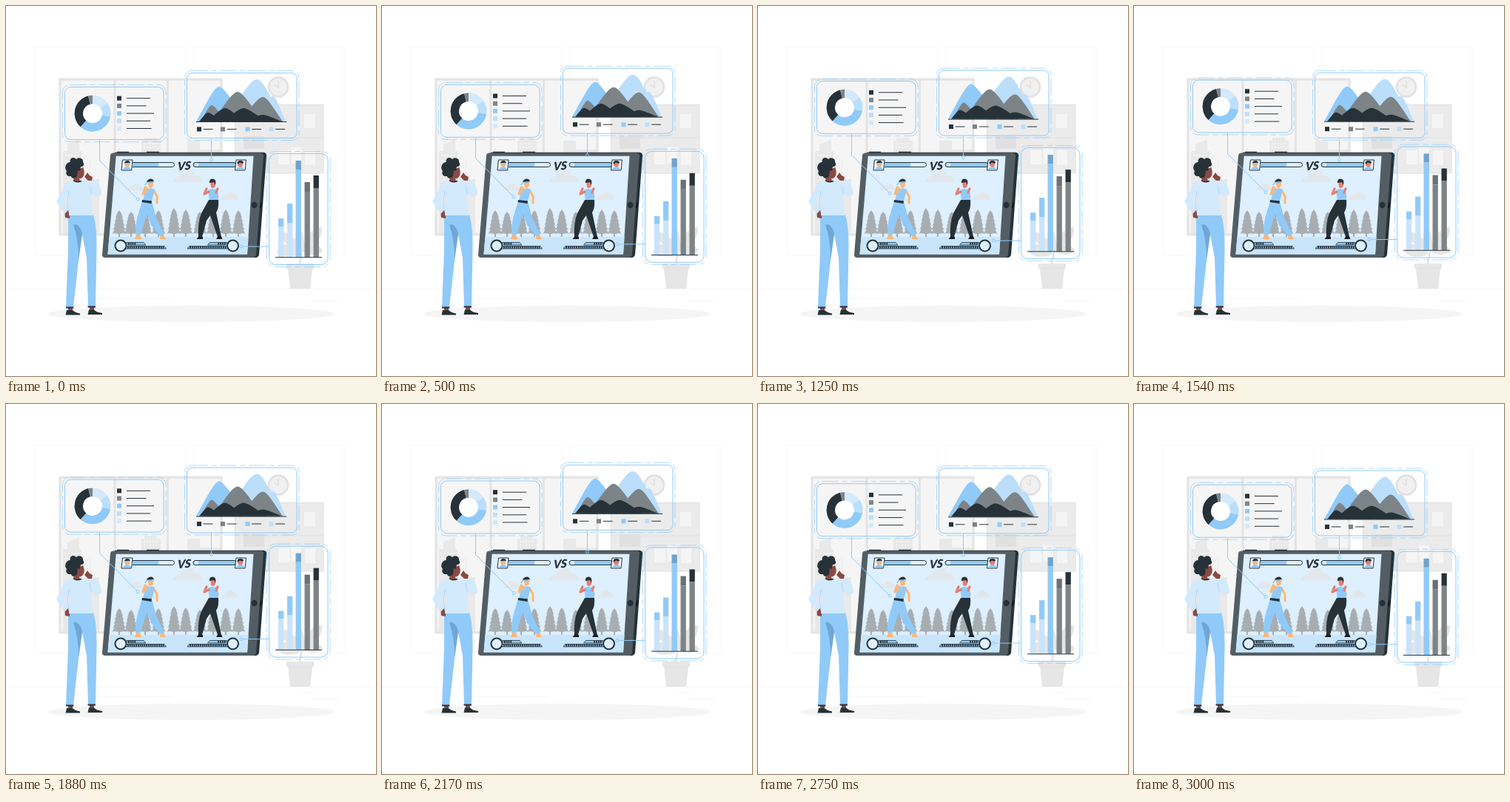
An HTML page that plays this animation: 500 px wide and 500 px high, repeating every 3040 ms.

```html
<!DOCTYPE html>
<html lang="en">
<head>
<meta charset="utf-8">
<title>Game analytics</title>
<style>
html, body { margin: 0; width: 100%; height: 100%; overflow: hidden; background: #fff; }
svg { display: block; width: 100vw; height: 100vh; }
.frame { fill: none; stroke: #90caf9; }
.dashes { fill: none; stroke: #90caf9; stroke-width: .7; stroke-dasharray: 22 5 7 5; }
.link, .dot { fill: none; stroke: #90caf9; }
.thin { stroke: #263238; stroke-width: 1; }
.limb { fill: none; stroke-linecap: round; stroke-linejoin: round; }
</style>
</head>
<body>
<svg viewBox="0 0 500 500">
  <g fill="none" stroke="#f5f5f5" stroke-width=".8">
    <rect x="39" y="55" width="204" height="282"/>
    <rect x="254" y="55" width="203" height="282"/>
    <path stroke="#ebebeb" stroke-width=".5" d="M0 382.300H500M112 395.300H224M400 389.500H416M416 398.500H448"/>
  </g>

  <g id="window">
    <rect x="73" y="99" width="218" height="210" fill="#f5f5f5"/>
    <g fill="#e9e9e9">
      <path d="M77 309V196H83V187L99 180V196H102V309ZM104 309V234H126V309ZM183 200V182H187V178H204V182H209V200ZM245 200V182H262V194H290V309H245Z"/>
      <path d="M113 208h1.200v30h-1.200z"/>
    </g>
    <path d="M80 202H100M80 209H100M80 216H100M186 186H207M186 191H207" stroke="#f5f5f5" stroke-width="2" stroke-dasharray="2 2"/>
    <path d="M73 99.200H291V309H73ZM147 99V309M218.500 99V309" fill="none" stroke="#e4e4e4" stroke-width="3.200"/>
  </g>

  <g id="shelf">
    <rect x="309.500" y="133.500" width="119.500" height="92.500" fill="#ebebeb" stroke="#e0e0e0"/>
    <path d="M310 178H429" stroke="#e0e0e0"/>
    <path d="M321 176h28v17h-28z" fill="#e0e0e0"/>
    <path d="M403 146h15v19h-15zM368 195h15v19h-15zM385 191h14v21l-13 1zM404 195h14v20h-14z" fill="#f5f5f5"/>
  </g>

  <g id="clock" stroke="#e0e0e0" fill="none">
    <circle cx="368" cy="109.500" r="13" fill="#f0f0f0" stroke-width="2.500"/>
    <path d="M368 101V110L362 106" stroke-width="1.500"/>
  </g>

  <g id="plant" fill="#e6e6e6">
    <path d="M379 348H416V355H414L411 382H384L381 355H379Z"/>
    <path d="M381 355H414" stroke="#e0e0e0"/>
    <path d="M397 348L401 326" stroke="#e0e0e0" stroke-width="2"/>
    <path d="M400 332C389 331 388 306 396 300C404 307 405 325 400 332ZM400 332C403 310 417 297 427 299C429 312 417 328 400 332ZM400 331C408 320 426 322 428 331C422 338 408 337 400 331ZM398 335C388 341 371 340 366 332C374 317 390 318 398 335ZM397 329C383 328 369 315 369 304C381 304 396 316 397 329Z"/>
  </g>

  <ellipse cx="250" cy="416" rx="194" ry="11" fill="#f5f5f5"/>

  <g id="tablet">
    <path d="M150 197.400H166M190 197.400H207" stroke="#263238" stroke-width="1.200"/>
    <path d="M147 197.700H348Q352 198 352 202L342 336Q341 340 337 340H140Z" fill="#263238"/>
    <path d="M146 198.600H344Q348 198.600 348 202L338 336Q337 340 333 340H134Q130 340 130 336L141 202Q141.500 198.600 146 198.600Z" fill="#535e64"/>
    <path d="M345.500 265L343.500 273" stroke="#111b20" stroke-width="2"/>
    <circle cx="335.500" cy="269" r="4.200" fill="#263238"/>
    <path d="M148.700 202.700H334.500L326 335.500H137.500Z" fill="#deeffd"/>
    <path d="M139.500 312H327.600L326 335.500H137.500Z" fill="#c9e5fc"/>
    <g fill="#e2e7eb">
      <path d="M225 238Q227 232 234 232Q237 222 245 224Q252 219 256 229Q265 230 266 238Z"/>
      <path d="M164 249Q166 243 171 243Q174 237 179 241Q185 243 186 249ZM290 262Q292 256 297 256Q302 247 307 254Q313 256 314 262Z"/>
    </g>
    <g id="trees" fill="#a8adb1"></g>

    <g id="hud">
      <g id="corner">
        <circle cx="155" cy="324" r="7.500" fill="#deeffd" stroke="#263238" stroke-width="2"/>
        <path d="M163 319.500H186L189 323H165Z" fill="#90caf9" stroke="#263238" stroke-width=".8"/>
        <path d="M163 324.500H214L216.500 328H162Z" fill="#90caf9" stroke="#263238" stroke-width=".8"/>
        <path d="M165 321.200H176M164 326.200H214" stroke="#263238" stroke-width="3" stroke-dasharray="1.800 1"/>
      </g>
      <use href="#corner" transform="matrix(-1 0 0 1 461.500 0)"/>
      <g stroke="#263238" stroke-width="1" stroke-linejoin="round">
        <rect x="169" y="211.500" width="58.500" height="6" rx="3" fill="#deeffd"/>
        <rect x="253" y="211.500" width="58" height="6" rx="3" fill="#90caf9"/>
        <path d="M157.500 208H171L169.500 222H156Z" fill="#f5f9fc"/>
        <path d="M311 208H324.500L323 222H309.500Z" fill="#f5f9fc"/>
      </g>
      <path d="M171 212H206V217H170.500Z" fill="#90caf9"/>
      <path d="M255 212.300H260V216.800H255Z" fill="#deeffd"/>
      <path d="M158 221Q160 217 163 217Q168 217 169 221Z" fill="#90caf9"/>
      <circle cx="164" cy="214" r="3.600" fill="#ffb573"/>
      <path d="M160 213Q160 209 164 209Q168 209 168 212.500Z" fill="#263238"/>
      <path d="M160 213L168 212.500" stroke="#90caf9" stroke-width="1.300"/>
      <path d="M311 221Q313 217 317 217Q321 217 322 221Z" fill="#90caf9"/>
      <circle cx="316.500" cy="214" r="3.600" fill="#e28078"/>
      <path d="M313 214Q311 209 317 209Q322 209 320.500 213L316 211.500Z" fill="#263238"/>
      <text transform="translate(240.500 221.500) rotate(-4) skewX(-8)" text-anchor="middle" font-family="Lato, Inter, sans-serif" font-size="15.500" font-weight="900" font-style="italic" fill="#263238">VS</text>
    </g>

    <g id="blue-fighter">
      <path class="limb" d="M200 250L204 257L204 266" stroke="#ffb573" stroke-width="3"/>
      <path d="M188 249Q195 244 201 248L197 264H185Z" fill="#90caf9"/>
      <path d="M184 264H197L203 286L214 309L209 312L196 296L191 281L187 292L182 309H175Q175 291 179 280Z" fill="#90caf9"/>
      <path d="M184 262L197 263.500L196.500 267L183.500 265Z" fill="#263238"/>
      <path d="M176 309H181L183 315H174ZM208.500 311L213 309L216 315H208Z" fill="#ffb573"/>
      <path class="limb" d="M189 251L185 254L188 245L192 248" stroke="#ffb573" stroke-width="3"/>
      <path d="M191.500 238H199L198.500 244Q195 247 193 245Z" fill="#ffb573"/>
      <path d="M190 239Q190 234 196 233.500Q200 234 200 238Z" fill="#263238"/>
      <path d="M190.500 238.500L200 237.500M191 238L187.500 242" stroke="#90caf9" stroke-width="1.700"/>
    </g>

    <g id="dark-fighter">
      <path class="limb" d="M284 250L285.500 258" stroke="#e28078" stroke-width="3.500"/>
      <path d="M273 249Q279 245 286 249L287 263H275Z" fill="#90caf9"/>
      <path d="M274 262H287Q288 273 284 279L291 312H286L276 283L271 290L265 312H260Q259 292 264 280Z" fill="#263238"/>
      <path d="M260 312H266V315H257.500ZM286 311.500H291L292.500 315H284Z" fill="#111b20"/>
      <path class="limb" d="M274 251L268 254L271 247M284 252L286 247" stroke="#e28078" stroke-width="3.200"/>
      <path d="M276 237H283V243Q281 248 277 245Z" fill="#e28078"/>
      <path d="M275 239Q274 234 279 233.500Q285 234 283 242L281 238Z" fill="#263238"/>
    </g>
  </g>

  <g id="viewer">
    <path d="M84 407H90V413H84ZM113 406H119V412H113Z" fill="#8b4a43"/>
    <path d="M82 411L90 411Q93 414 100 415.500V417.500H80.500ZM112 410.500L119 410.500Q122 414 130 415V417H110.500Z" fill="#263238"/>
    <path d="M84 282H118Q123 298 122.500 330L121 406H111L109 340L103 308L98 345L91 407H81L84 330Z" fill="#90caf9"/>
    <path d="M91 296Q99 291 104 311L103 308L98 342Q98 314 91 296Z" fill="#6fa8d8"/>
    <path d="M81 407.500H91.500M110.500 406.500H121" stroke="#263238" stroke-width="1.800"/>
    <path d="M79 276L86 274V287L80 286Z" fill="#8b4a43"/>
    <path d="M86 237Q79 238 76 248L68 264L79 281L85 275L79 264L85 255V283H117L115 253Q123 260 129 255Q130 249 123 237L117 234L112 238Q104 234 93 236Z" fill="#d3e9fc"/>
    <path d="M85 250L83 265L85 279M113 242L115 254" fill="none" stroke="#b4d7f5" stroke-width="1"/>
    <path d="M93 223L104 218Q107 224 105 229Q103 234 99 233L100 237Q95 239 91 236Z" fill="#8b4a43"/>
    <path d="M106 231L110 225L113 229L117 231L116 236L111 236Z" fill="#8b4a43"/>
    <path d="M91 236Q95 239 102 236.500" fill="none" stroke="#263238" stroke-width="1.500"/>
    <path d="M87 211C85 205 92 203 95 207C99 203 105 207 104 211C107 214 104 218 101 217L100 223L97 222L96 230C93 234 88 233 88 230C82 231 80 226 82 223C78 219 81 211 87 211Z" fill="#263238"/>
  </g>

  <g id="donut-panel">
    <rect class="frame" x="79.500" y="109.500" width="133.500" height="71" rx="8"/>
    <rect class="dashes" x="76.500" y="106.500" width="139.500" height="77" rx="10"/>
    <path class="link" d="M126.500 181V209L176.500 259.500"/>
    <circle class="dot" cx="178" cy="261" r="2"/>
    <circle cx="117" cy="145.200" r="14" fill="#fff"/>
    <g id="donut" fill="none" stroke-width="11.500"></g>
    <g id="donut-legend"></g>
  </g>

  <g id="hill-panel">
    <rect class="frame" x="244.500" y="90.500" width="148.500" height="88" rx="7"/>
    <rect class="dashes" x="241.500" y="87.500" width="154.500" height="94" rx="9"/>
    <path class="link" d="M277.500 179V206"/>
    <circle class="dot" cx="277.500" cy="208" r="2"/>
    <g id="hills"></g>
    <path class="thin" d="M257 156.500H379"/>
    <g id="hill-legend"></g>
  </g>

  <g id="bar-panel">
    <rect class="frame" x="355.500" y="199.500" width="79.500" height="150" rx="9"/>
    <rect class="dashes" x="352.500" y="196.500" width="85.500" height="156" rx="11"/>
    <path class="link" d="M320 325H355.500"/>
    <circle class="dot" cx="318" cy="325" r="2"/>
    <g id="bars"></g>
    <path class="thin" d="M364 339.700H427"/>
  </g>
</svg>
<script>
const LOOP = 3040, FRAMES = 73, LIFT = 9.6;
const DARK = '#263238', GREY = '#7d8487', BLUE = '#90caf9', SKY = '#bbdefb', PALE = '#d3e9fc';
const byId = id => document.getElementById(id);

function add(parent, tag, attrs) {
  const node = document.createElementNS('http://www.w3.org/2000/svg', tag);
  for (const key in attrs) node.setAttribute(key, attrs[key]);
  byId(parent).append(node);
}
const box = (parent, x, y, width, height, fill) => add(parent, 'rect', { x, y, width, height, fill });
const rule = (parent, x1, x2, y) => add(parent, 'path', { class: 'thin', d: `M${x1} ${y}H${x2}` });

function tree(x, top) {
  const base = 308, tiers = 6, left = [], right = [];
  for (let i = 1; i <= tiers; i++) {
    const y = top + (base - top) * i / tiers, w = 2 + 7.5 * (i / tiers) ** .8;
    left.push(`${x - w} ${y}`, `${x - w * .72} ${y - 1}`);
    right.unshift(`${x + w * .72} ${y - 1}`, `${x + w} ${y}`);
  }
  add('trees', 'path', { d: `M${x} ${top}L${left.join('L')}L${x - 1} ${base}V312H${x + 1}V${base}L${right.join('L')}Z` });
}
[[153, 276], [169, 278], [188, 275], [206, 276], [227, 273], [243, 275], [262, 278], [280, 275], [297, 275], [314, 276]]
  .forEach(t => tree(...t));

function arc(from, to, stroke) {
  const point = deg => {
    const a = deg * Math.PI / 180;
    return `${117 + 18.7 * Math.sin(a)} ${145.2 - 18.7 * Math.cos(a)}`;
  };
  add('donut', 'path', { d: `M${point(from)}A18.7 18.7 0 0 1 ${point(to)}`, stroke });
}
arc(0, 55, PALE);
arc(55, 100, SKY);
arc(100, 222, BLUE);
arc(222, 346, DARK);
arc(346, 360, GREY);

[[DARK, 195], [GREY, 189.5], [BLUE, 200], [SKY, 195], [PALE, 196.5]].forEach(([color, end], i) => {
  const y = 124.7 + i * 10.2;
  box('donut-legend', 150, y - 3, 6, 6, color);
  rule('donut-legend', 163, end, y);
});

function hill(left, peak, top, right, fill) {
  const base = 156, foot = base - (base - top) * .45, a = peak - left, b = right - peak;
  add('hills', 'path', { fill, d: `M${left} ${base}C${left + a * .4} ${foot} ${peak - a * .22} ${top} ${peak} ${top}` +
    `S${right - b * .4} ${foot} ${right} ${base}Z` });
}
hill(295, 339, 99, 374, SKY);
hill(335, 360, 122, 378, SKY);
hill(257, 288, 109, 325, BLUE);
hill(263, 278, 134, 298, GREY);
hill(279, 313, 116, 347, GREY);
hill(316, 347, 123, 374, GREY);
hill(261, 273, 144, 293, DARK);
hill(272, 296, 138, 322, DARK);
hill(294, 321, 138, 352, DARK);
hill(325, 347, 147, 373, DARK);

[[258, DARK], [290, GREY], [323.5, BLUE], [355.5, SKY]].forEach(([x, color]) => {
  box('hill-legend', x, 163.5, 6, 6, color);
  rule('hill-legend', x + 8.7, x + 21.5, 166.5);
});

[[368, 287, 298, BLUE, '#c8e4fc'], [380, 267, 293, BLUE, '#c8e4fc'], [391.5, 209, 221, '#6fa3cc', BLUE],
 [403.5, 238, 251, '#697176', GREY], [415.5, 229, 246, DARK, GREY]].forEach(([x, top, split, cap, body]) => {
  box('bars', x, top, 7.3, split - top, cap);
  box('bars', x, split, 7.3, 339.5 - split, body);
});

// Triangle wave from 0 up to 1 and back.
const wave = phase => 1 - Math.abs(1 - 2 * (phase % 1));
const raise = (id, phase) => byId(id).setAttribute('transform', `translate(0 ${-LIFT * wave(phase)})`);

function draw(ms) {
  const phase = Math.floor((ms % LOOP) / LOOP * FRAMES) / FRAMES;
  raise('donut-panel', phase);
  raise('bar-panel', phase);
  raise('hill-panel', phase * 2);
}

const start = performance.now();
function tick() {
  draw(performance.now() - start);
  requestAnimationFrame(tick);
}
tick();
</script>
</body>
</html>
```
